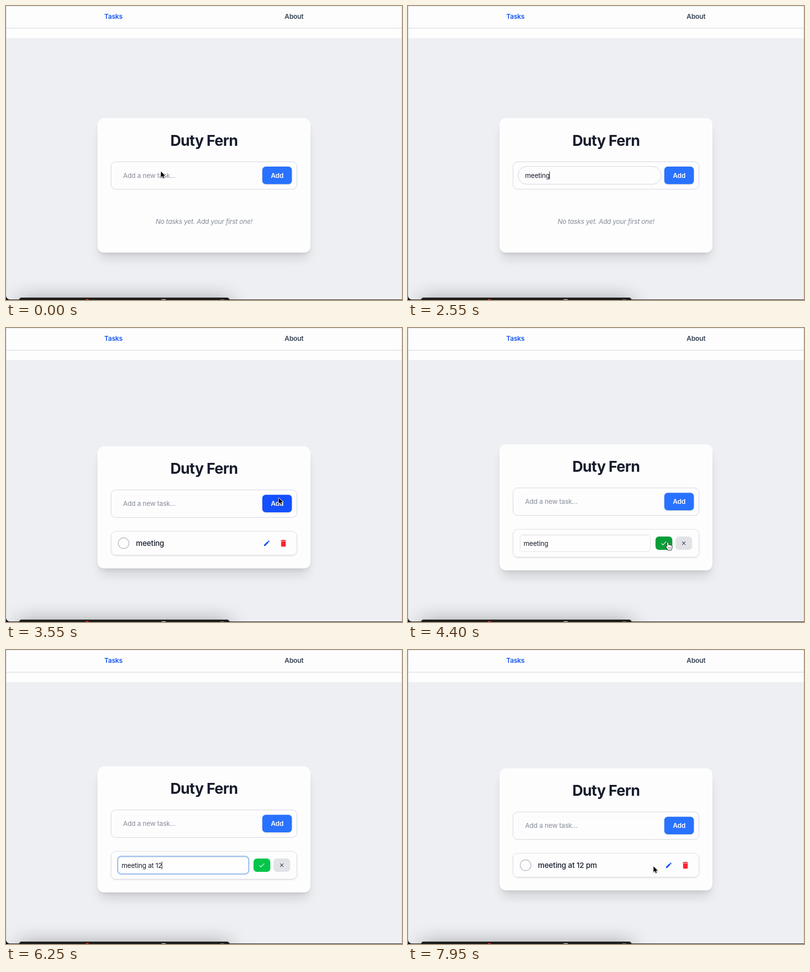
An HTML page with a canvas that plays this animation: 800x595 px, repeating every 8 s.

```html
<!DOCTYPE html>
<html lang="en">
<head>
<meta charset="utf-8">
<title>Tasks</title>
<style>
  html, body { margin: 0; width: 100%; height: 100%; overflow: hidden; background: #eeeff3; }
  canvas { display: block; width: 800px; height: 595px; }
</style>
</head>
<body>
<canvas id="stage" width="800" height="595"></canvas>
<script>
const ctx = document.getElementById('stage').getContext('2d');
const LOOP = 8000, STEP = 50;
const INK = '#161c2b', MUTED = '#868c98', LINE = '#d1d4da', PAPER = '#fdfdfe';

const PENCIL = new Path2D('M3 17.25V21h3.75L17.81 9.94l-3.75-3.75L3 17.25zM20.71 7.04a1 1 0 0 0 0-1.41l-2.34-2.34a1 1 0 0 0-1.41 0l-1.83 1.83 3.75 3.75 1.83-1.83z');
const TRASH = new Path2D('M6 19a2 2 0 0 0 2 2h8a2 2 0 0 0 2-2V7H6v12zM19 4h-3.5l-1-1h-5l-1 1H5v2h14V4z');
const ARROW = new Path2D('M0 0V11.6L2.7 9.1 4.5 13.2 6.5 12.4 4.8 8.4H8.6Z');
const HAND = new Path2D('M-1.3 1C-1.3-.4 1.1-.4 1.1 1V5.3C1.6 4.3 3.3 4.6 3.5 5.7 4.3 4.8 5.7 5.2 5.8 6.3 6.8 5.8 8 6.4 8 7.6V10.5C8 12.5 7 13.4 6.8 15H.3C0 13.4-2.6 11.2-3.6 9.3-4.3 8-2.9 7.2-2 8L-1.3 8.7Z');
const KNUCKLES = new Path2D('M1.5 10V12.5M3.5 10V12.5M5.5 10V12.5');

// Moments of the story, in ms
const FOCUS_NEW = 950, BLUR_NEW = 3200, ADDED = 3500;
const EDIT = 4400, FOCUS_EDIT = 5500, SAVED = 7250;
const NEW_KEYS = [1750, 1850, 1950, 2100, 2250, 2350, 2500];
const EDIT_KEYS = [5700, 5800, 5900, 6050, 6150, 6250, 6400, 6550, 6650];
const HIDDEN = [[1750, 2700], [5700, 6750]];

// Pointer stops: time, x, y
const PATH = [
  [0, 313, 335], [400, 313, 335], [850, 292, 342], [2700, 292, 342],
  [3300, 551, 344], [3600, 551, 344], [4200, 525, 434], [4500, 525, 434],
  [4800, 520.5, 437], [5200, 520.5, 437], [5450, 340, 437], [6750, 340, 437],
  [7100, 517, 434], [7750, 517, 434], [7950, 496, 438], [8000, 496, 438]
];

const clamp = v => Math.max(0, Math.min(1, v));
const ease = v => v * v * (3 - 2 * v);

function pointerAt(t) {
  const i = PATH.findIndex(p => p[0] > t);
  const [t0, x0, y0] = PATH[i - 1], [t1, x1, y1] = PATH[i];
  const k = ease((t - t0) / (t1 - t0));
  return { x: x0 + (x1 - x0) * k, y: y0 + (y1 - y0) * k };
}

const inside = (p, x, y, w, h) => p.x >= x && p.x <= x + w && p.y >= y && p.y <= y + h;

function typed(text, keys, t) {
  return text.slice(0, keys.filter(k => k <= t).length);
}

function caretOn(focus, keys, t) {
  const last = Math.max(focus, ...keys.filter(k => k <= t));
  return t >= focus && (t - last) % 1000 < 500;
}

function shadow(color, blur, y) {
  ctx.shadowColor = color;
  ctx.shadowBlur = blur;
  ctx.shadowOffsetY = y;
}

function box(x, y, w, h, r, fill, stroke, width = 1) {
  ctx.beginPath();
  ctx.roundRect(x, y, w, h, r);
  if (fill) { ctx.fillStyle = fill; ctx.fill(); }
  if (!stroke) return;
  ctx.beginPath();
  ctx.roundRect(x + width / 2, y + width / 2, w - width, h - width, r - width / 2);
  ctx.strokeStyle = stroke;
  ctx.lineWidth = width;
  ctx.stroke();
}

function raised(color, blur, dy, ...args) {
  ctx.save();
  shadow(color, blur, dy);
  box(...args);
  ctx.restore();
}

function text(str, x, y, { size = 13.33, weight = 400, color = INK, align = 'left', track = -0.011, style = '' } = {}) {
  ctx.font = `${style} ${weight} ${size}px Inter, sans-serif`;
  ctx.letterSpacing = `${size * track}px`;
  ctx.textAlign = align;
  ctx.fillStyle = color;
  ctx.fillText(str, x, y);
  return ctx.measureText(str).width;
}

function caret(x, y) {
  ctx.fillStyle = INK;
  ctx.fillRect(Math.round(x) - 0.5, y, 1, 16);
}

function stroke(points, color, width) {
  ctx.beginPath();
  points.forEach(([x, y], i) => i ? ctx.lineTo(x, y) : ctx.moveTo(x, y));
  ctx.strokeStyle = color;
  ctx.lineWidth = width;
  ctx.stroke();
}

function icon(path, x, y, scale, color) {
  ctx.save();
  ctx.translate(x - 12 * scale, y - 12 * scale);
  ctx.scale(scale, scale);
  ctx.fillStyle = color;
  ctx.fill(path);
  ctx.restore();
}

function drawPage() {
  ctx.fillStyle = '#111';
  ctx.fillRect(0, 0, 800, 595);
  box(0, 0, 800, 594, [0, 0, 0, 8], '#eeeff3');
  ctx.fillStyle = PAPER;
  ctx.fillRect(0, 0, 800, 65);
  ctx.fillStyle = '#dddfe3';
  ctx.fillRect(0, 44.3, 800, 1.4);
  ctx.fillStyle = '#e4e5e8';
  ctx.fillRect(0, 0, 800, 1);
  ctx.fillStyle = '#d6d7db';
  ctx.fillRect(0, 0, 1, 586);
  ctx.fillRect(799, 0, 1, 594);
  const nav = { weight: 600, align: 'center' };
  text('Tasks', 217, 26, { ...nav, color: '#1656ec' });
  text('About', 582, 26, { ...nav, color: '#364153' });
}

function drawDock() {
  raised('rgba(0,0,0,.46)', 40, 7, 26, 590, 426, 20, 6, '#1d1d1b', '#3b3a37');
  box(160, 593, 8, 8, 4, '#e5262c');
  box(314, 593.5, 9, 4, 1, '#b9b9b9');
  box(433, 594, 8, 4, 1, '#8a8a8a');
}

function drawCard(top, height) {
  raised('rgba(0,0,0,.11)', 21, 17, 189, top + 4, 422, height - 8, 10, PAPER);
  raised('rgba(0,0,0,.1)', 9, 6, 189, top + 4, 422, height - 8, 10, PAPER);
  box(185, top, 430, height, 13, PAPER);
  text('Duty Fern', 400, top + 55.5, { size: 30, weight: 700, align: 'center', track: -0.025 });
}

function drawForm(top, t, pointer) {
  box(211.7, top, 376.6, 56.7, 10, null, LINE);
  const focus = clamp((t - FOCUS_NEW) / 150) * clamp((BLUR_NEW + 150 - t) / 150);
  box(222, top + 9.5, 290, 37, 18.5, null, '#f8f8fa');
  ctx.globalAlpha = focus;
  box(222, top + 9.5, 290, 37, 18.5, null, '#cfd1d6');
  ctx.globalAlpha = 1;

  const value = t < ADDED ? typed('meeting', NEW_KEYS, t) : '';
  const width = text(value || 'Add a new task...', 236.5, top + 33, { color: value ? INK : MUTED });
  if (t < BLUR_NEW && caretOn(FOCUS_NEW, NEW_KEYS, t)) caret(236.5 + (value ? width : 0), top + 20);

  const hover = inside(pointer, 518, top + 10, 60, 36);
  raised('rgba(0,0,0,.14)', 3, 1, 517.8, top + 10.2, 59.7, 35.6, 7, hover ? '#1450ff' : '#2872ff');
  text('Add', 547.8, top + 33, { weight: 600, align: 'center', color: '#fff' });
}

function drawRow(top, height) {
  raised('rgba(0,0,0,.15)', 3, 1, 212, top, 376, height, 10, PAPER);
  box(212, top, 376, height, 10, PAPER, '#e1e3e7');
}

function drawTask(label) {
  drawRow(411, 49);
  ctx.beginPath();
  ctx.arc(237.6, 435.5, 10.9, 0, Math.PI * 2);
  ctx.strokeStyle = '#bfc3ca';
  ctx.lineWidth = 1.6;
  ctx.stroke();
  text(label, 262.5, 441, { size: 15, weight: 500 });
  icon(PENCIL, 526.8, 435.6, 0.62, '#1656ec');
  icon(TRASH, 560.4, 435.6, 0.77, '#fb2530');
}

function drawEditor(t, pointer) {
  drawRow(407, 57);
  box(226, 418, 264, 35, 7, '#fefefe', '#dfe1e5');
  ctx.fillStyle = 'rgba(0,0,0,.035)';
  ctx.fillRect(231, 419, 254, 2);
  const ring = clamp((t - FOCUS_EDIT) / 150);
  if (ring) {
    ctx.globalAlpha = ring;
    box(224.5, 416.5, 267, 38, 8.5, null, '#8dbcf3', 2);
    ctx.globalAlpha = 1;
  }
  const width = text('meeting' + typed(' at 12 pm', EDIT_KEYS, t), 233.5, 440.5);
  if (caretOn(FOCUS_EDIT, EDIT_KEYS, t)) caret(233.5 + width, 428);

  const hover = inside(pointer, 500, 422, 34, 27);
  box(500, 422, 34, 27, 7, hover ? '#079e38' : '#03c54b');
  stroke([[512, 436], [515, 439], [521.7, 432.2]], '#fff', 1.1);
  box(540.5, 422, 33.5, 27, 7, '#e1e3e7');
  stroke([[553.8, 432.2], [560.4, 438.8]], '#364153', 1.2);
  stroke([[560.4, 432.2], [553.8, 438.8]], '#364153', 1.2);
}

function drawPointer({ x, y }, hand) {
  ctx.save();
  ctx.translate(x, y);
  ctx.lineJoin = 'round';
  shadow('rgba(0,0,0,.3)', 2, 1);
  ctx.strokeStyle = hand ? '#111' : '#fff';
  ctx.lineWidth = hand ? 1.4 : 1.6;
  ctx.stroke(hand ? HAND : ARROW);
  shadow('transparent', 0, 0);
  ctx.fillStyle = hand ? '#fff' : '#050505';
  ctx.fill(hand ? HAND : ARROW);
  if (hand) {
    ctx.lineWidth = 0.7;
    ctx.stroke(KNUCKLES);
  }
  ctx.restore();
}

function draw(t) {
  const pointer = pointerAt(t);
  const editing = t >= EDIT && t < SAVED;
  const listed = t >= ADDED && !editing;
  const [top, height] = editing ? [235.5, 255] : listed ? [239.5, 247] : [227, 272];

  drawPage();
  drawDock();
  drawCard(top, height);
  drawForm(top + 87.7, t, pointer);
  if (editing) drawEditor(t, pointer);
  else if (listed) drawTask(t < SAVED ? 'meeting' : 'meeting at 12 pm');
  else text('No tasks yet. Add your first one!', 400, 440.5, { color: MUTED, align: 'center', style: 'italic', track: -0.017 });

  const hand = editing ? inside(pointer, 500, 422, 74, 27) : listed && inside(pointer, 515, 425, 60, 22);
  if (!HIDDEN.some(([from, to]) => t >= from && t < to)) drawPointer(pointer, hand);
}

function tick() {
  const t = performance.now() % LOOP;
  draw(Math.floor(t / STEP) * STEP);
  requestAnimationFrame(tick);
}
tick();
</script>
</body>
</html>
```
